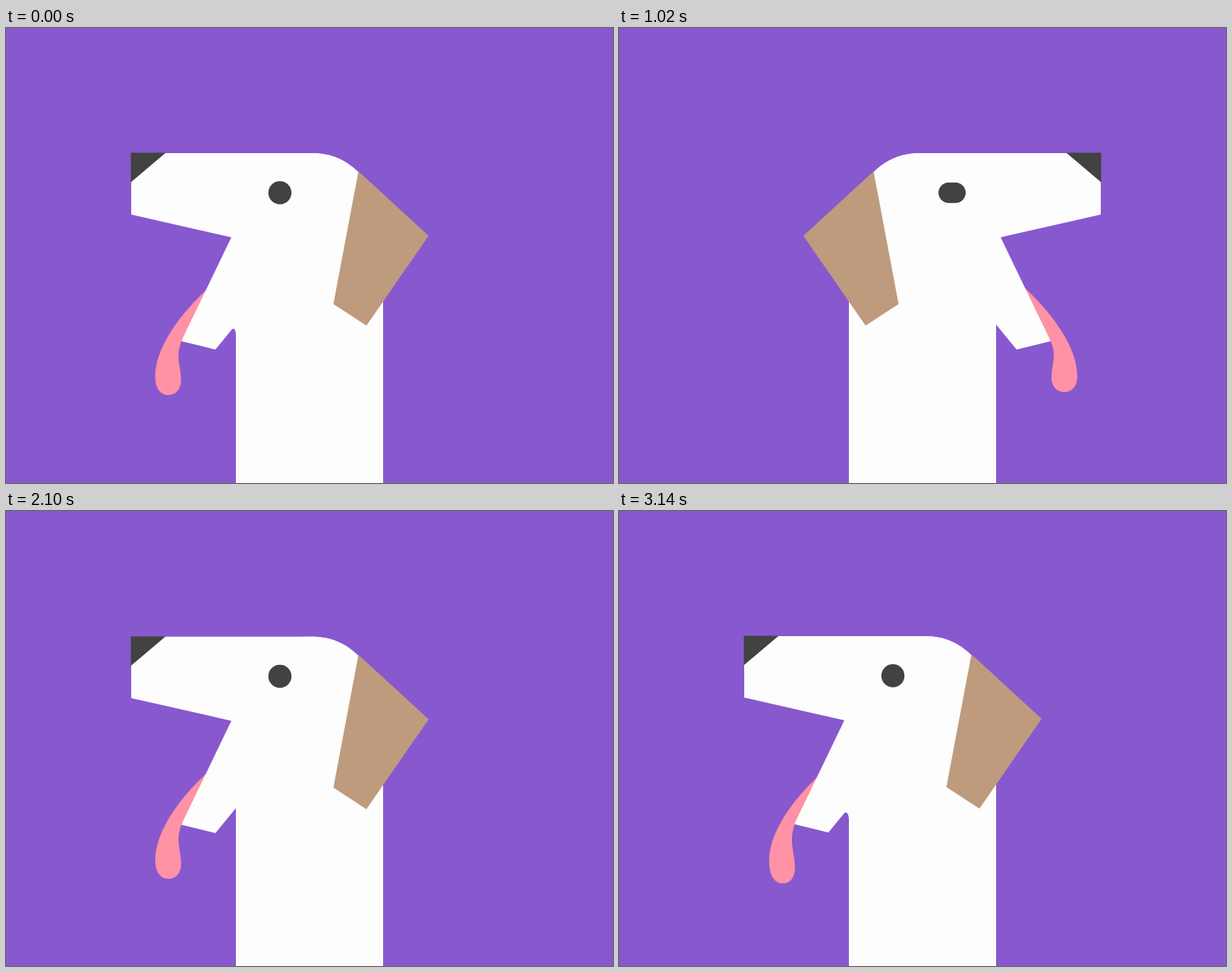
These frames come from a looping animation (800 px wide and 600 px high, 3.16 s). An HTML page:

```html
<!DOCTYPE html>
<html lang="en">
<head>
<meta charset="utf-8">
<title>Dog</title>
<style>
  html, body { margin: 0; width: 100%; height: 100%; overflow: hidden; background: #8858cf; }
  svg { display: block; width: 100vw; height: 100vh; }
</style>
</head>
<body>
<svg viewBox="0 0 800 600">
  <rect width="800" height="600" fill="#8858cf"/>
  <g id="dog">
    <g class="side"><path id="tongue" fill="#ff92a5"/></g>
    <path fill="#fdfdfd" d="M303 620V224L336 191C352 174 371 165 397 165H403C429 165 448 174 464 191L497 224V620Z"/>
    <g class="side">
      <path id="head" fill="#fdfdfd"/>
      <path fill="#424242" d="M164.5 164.5H210.5L164.5 203.5Z"/>
      <path fill="#be9b7d" d="M464.5 189L557 274L475 392.5L431.5 364Z"/>
      <rect id="eye" fill="#424242"/>
    </g>
  </g>
</svg>
<script>
const LOOP = 3160;
const HALF = 1580;
const PANT = 460;
const $ = id => document.getElementById(id);
const sides = document.querySelectorAll('.side');
const clamp = v => Math.max(0, Math.min(1, v));
const smooth = v => v * v * (3 - 2 * v);
const bump = (t, start, length) => Math.sin(Math.PI * clamp((t - start) / length)) ** 2;

// Linear interpolation through [time, value] pairs.
function track(t, keys) {
  const i = Math.max(1, keys.findIndex(key => key[0] >= t));
  const [t0, v0] = keys[i - 1], [t1, v1] = keys[i];
  return v0 + (v1 - v0) * clamp((t - t0) / (t1 - t0));
}

const chinKeys = [[0, 1], [300, 1.05], [900, 0], [2000, 0], [2420, .5], [3140, 1.2], [LOOP, 1.2]];

function tonguePath(k) {
  const x = (base, shift) => (base + shift * k).toFixed(2);
  return `M285 ${x(325, 5)}
    C${x(245, 1)} ${x(358, 4)} ${x(196, 2)} ${x(412, 2)} ${x(196, 2)} ${x(459, 3)}
    C${x(196, 2)} ${x(473, 9)} ${x(203, 3)} ${x(480, 12)} ${x(213, 3)} ${x(480, 12)}
    C${x(223, 3)} ${x(480, 12)} ${x(230, 2)} ${x(473, 11)} ${x(230, 2)} ${x(461, 10)}
    C${x(230, 2)} ${x(450, 6)} ${x(227, 1)} ${x(442, 6)} ${x(227, 1)} ${x(431, 3)}
    C${x(227, 1)} ${x(424, 1)} ${x(229, 1)} ${x(418, 1)} 232 410
    L260 410L300 325Z`;
}

function headPath(n) {
  return `M165 165H403C429 165 448 174 464.5 190L460 364H400V430H303
    V${391 + 14 * n}C303 ${391 + 7 * n} ${303 - 2.5 * n} ${391 + 3.5 * n}
    ${303 - 5.5 * n} ${391 + 6.7 * n}L276 424L231 413L297 276L165 246Z`;
}

function draw(t) {
  const dip = 8 * (bump(t, 30, 540) + bump(t, 30 + HALF, 540));
  const turn = start => smooth(clamp((t - start) / 200));
  const facing = 1 - 2 * turn(60) + 2 * turn(60 + HALF);
  $('dog').setAttribute('transform', `translate(0 ${dip})`);
  sides.forEach(side => side.setAttribute('transform', `translate(400) scale(${facing} 1) translate(-400)`));

  const pant = Math.sin(Math.PI * ((t + 331) / PANT)) ** 4;
  $('tongue').setAttribute('d', tonguePath(pant * .97));
  $('head').setAttribute('d', headPath(track(t, chinKeys)));

  const blink = bump(t, 973, 304) + bump(t, 973 + HALF, 304);
  const w = 30.5 + 23.5 * blink, h = 30.5 - 16 * blink;
  const box = { x: 361 - w / 2, y: 217.3 - h / 2, width: w, height: h, rx: h / 2 };
  for (const name in box) $('eye').setAttribute(name, box[name]);
}

const began = performance.now();
function tick() {
  draw((performance.now() - began) % LOOP);
  requestAnimationFrame(tick);
}
tick();
</script>
</body>
</html>
```
